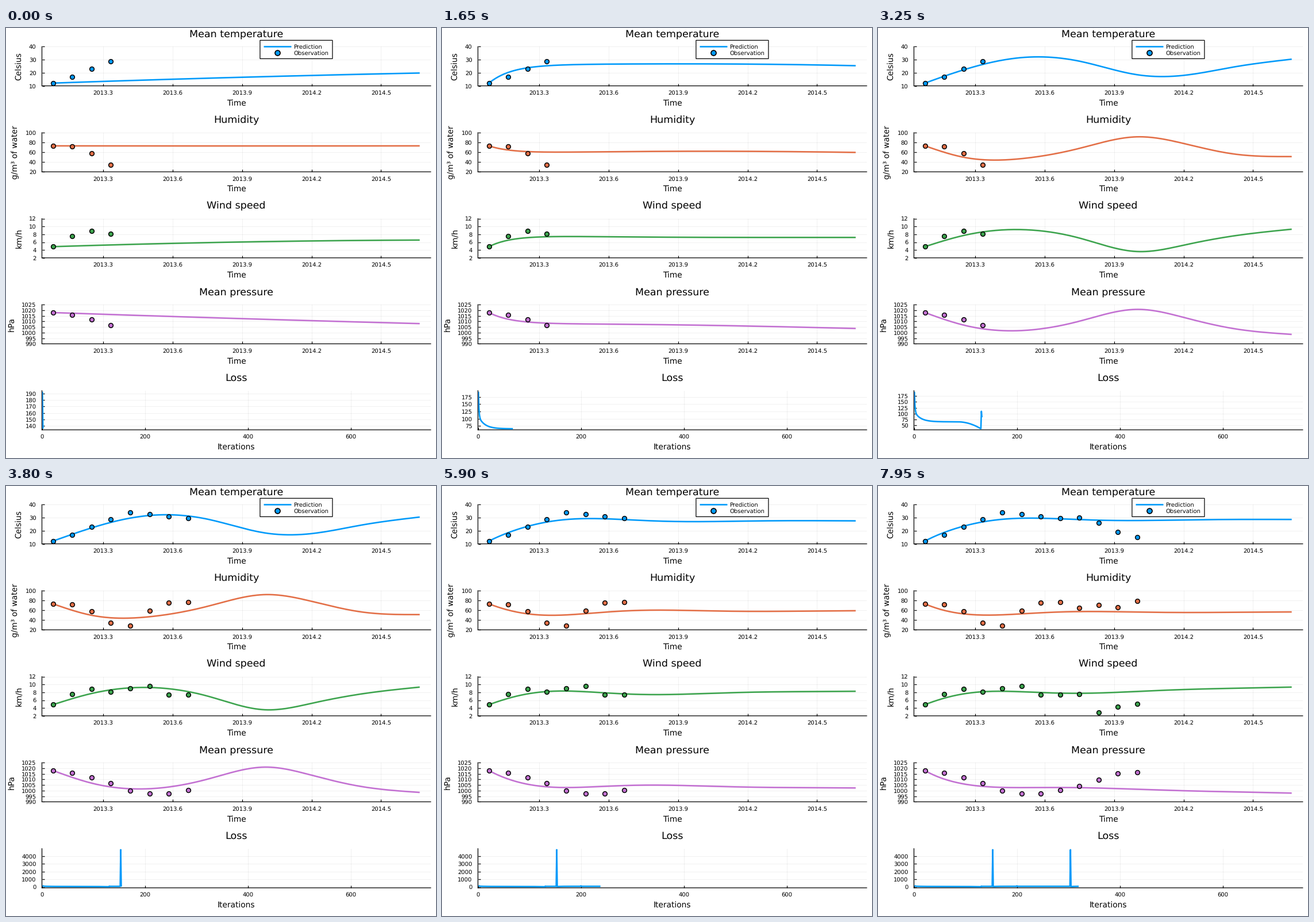
Write a matplotlib script that moves like this. It is 748x748 px and loops after 8 s.

```python
import numpy as np
import matplotlib.pyplot as plt
from matplotlib.animation import FuncAnimation
from matplotlib.lines import Line2D
from matplotlib.patches import Rectangle
from matplotlib.ticker import FuncFormatter, MultipleLocator
from matplotlib.transforms import Affine2D

S = 748            # stage size in pixels
PT = 0.72          # points per pixel at 100 dpi
FRAMES, STEP = 160, 50
LEFT, RIGHT, TOP, HEIGHT, ROW = 62.5, 738.8, 32.4, 68.2, 149.6
SMALL, MID, BIG = 9.97 * PT, 13.71 * PT, 17.45 * PT
LINE, AXIS = 2.6 * PT, 1.25 * PT
BLUE = "#009AFA"

plt.rcParams.update({"font.family": "DejaVu Sans", "text.hinting": "no_hinting"})
fig = plt.figure(figsize=(7.48, 7.48), dpi=100, facecolor="white")
PIX = Affine2D().scale(1 / S, -1 / S).translate(0, 1) + fig.transFigure

START = 2013 + 1 / 12
MONTHS = np.linspace(0, 19, 240)
SWING_KEYS = np.array([0, 2, 5, 8, 11, 13.5, 16, 19])
CALM_KEYS = np.array([2, 5, 9, 19])

# slope: first guess; rise, bend, level, last: values at CALM_KEYS;
# swing: values at SWING_KEYS after the start.
PANELS = [
    dict(title="Mean temperature", label="Celsius", label_x=26, color=BLUE,
         lim=(10, 40), step=10,
         obs=[12.1, 16.9, 22.85, 28.9, 33.85, 32.5, 30.75, 29.5, 29.9, 26.1, 18.9, 15.15],
         slope=(9.7, -2.0), rise=(23.8, 26.4, 26.8, 25.4), bend=(23.2, 27.0, 27.65, 25.0),
         level=(23.3, 29.2, 27.0, 27.15), last=(23.5, 29.6, 28.1, 28.65),
         swing=(22.2, 31.7, 28.9, 18.3, 18.0, 24.4, 30.5)),
    dict(title="Humidity", label="g/m³ of water", label_x=19.7, color="#E36F47",
         lim=(20, 100), step=20,
         obs=[73, 72, 57.6, 34.7, 29, 59, 75, 77, 64.7, 70.3, 66.3, 79.2],
         slope=(-0.8, 0.8), rise=(61.3, 60.5, 61.8, 59.6), bend=(54.5, 57.9, 68.2, 52.3),
         level=(52.7, 53.2, 61.4, 60.0), last=(52.6, 52.6, 57.3, 56.5),
         swing=(49.7, 46.7, 67.9, 91.9, 77.2, 56.4, 51.1)),
    dict(title="Wind speed", label="km/h", label_x=26, color="#3DA44E",
         lim=(2, 12), step=2,
         obs=[4.85, 7.5, 8.8, 8.07, 8.95, 9.6, 7.4, 7.4, 7.6, 2.82, 4.26, 5.0],
         slope=(3.0, -1.32), rise=(7.15, 7.42, 7.27, 7.2), bend=(7.75, 7.75, 6.76, 7.92),
         level=(7.6, 8.16, 7.25, 7.83), last=(7.6, 8.15, 7.83, 9.33),
         swing=(7.7, 9.23, 7.05, 3.54, 5.3, 7.6, 9.33)),
    dict(title="Mean pressure", label="hPa", label_x=13.5, color="#C371D2",
         lim=(990, 1025), step=5,
         obs=[1017.9, 1016, 1011.8, 1006.4, 999.9, 997.4, 997.4, 1000.5,
              1004, 1009.9, 1015.4, 1016.2],
         slope=(-11.2, 1.35), rise=(1009.5, 1007.75, 1007.1, 1003.7),
         bend=(1009.2, 1008.5, 1009.9, 999), level=(1005.6, 1003.3, 1005.95, 1004.25),
         last=(1006, 1002.7, 1002.3, 997.8),
         swing=(1006.7, 1001.7, 1010.2, 1021, 1013.3, 1003.6, 998.4)),
]


def spline(x, y, at):
    """Natural cubic spline through (x, y)."""
    n, h = len(x), np.diff(x)
    a, b = np.eye(n), np.zeros(n)
    for i in range(1, n - 1):
        a[i, i - 1:i + 2] = h[i - 1], 2 * (h[i - 1] + h[i]), h[i]
        b[i] = 6 * ((y[i + 1] - y[i]) / h[i] - (y[i] - y[i - 1]) / h[i - 1])
    m = np.linalg.solve(a, b)
    i = np.clip(np.searchsorted(x, at) - 1, 0, n - 2)
    u, v, w = x[i + 1] - at, at - x[i], h[i]
    return ((m[i] * u**3 + m[i + 1] * v**3) / (6 * w)
            + (y[i] / w - m[i] * w / 6) * u + (y[i + 1] / w - m[i + 1] * w / 6) * v)


def damped(y0, values, decay, freq, rush):
    """Quick rise, damped wave and drift from y0 through the values at CALM_KEYS."""
    def basis(t):
        fade = np.exp(-decay * t)
        return np.stack([1 - fade * np.cos(freq * t), fade * np.sin(freq * t),
                         1 - np.exp(-rush * t), t], axis=-1)
    return y0 + basis(MONTHS) @ np.linalg.solve(basis(CALM_KEYS), np.array(values) - y0)


def shapes(p):
    y0, (b, c), t = p["obs"][0], p["slope"], MONTHS / 19
    return np.array([
        y0 + b * t + c * t * t,
        damped(y0, p["rise"], 0, 0.12, 0.85),
        damped(y0, p["bend"], 0, 0.3, 0.65),
        spline(SWING_KEYS, np.array([y0, *p["swing"]]), MONTHS),
        damped(y0, p["level"], 0.22, 0.56, 0.7),
        damped(y0, p["last"], 0.22, 0.56, 0.7),
    ])


def linear(u):
    return u


def smooth(u):
    return u * u * (3 - 2 * u)


def late(u):
    return u ** 1.7


def settle(u):
    return (1 - np.exp(-8 * u)) / (1 - np.exp(-8))


# Frame, weights of the shapes there, easing on the way to it
GUESS, RISE, BEND, SWING, LEVEL, LAST = np.eye(6)
POSES = [(0, GUESS, linear), (33, RISE, settle), (54, BEND, late), (66, SWING, smooth),
         (76, SWING, linear), (99, 0.45 * LEVEL + 0.55 * LAST, settle),
         (139, LEVEL, linear), (150, LEVEL, linear), (151, SWING, linear),
         (158, LAST, smooth), (FRAMES, LAST, linear)]


def weights(k):
    for (k0, w0, _), (k1, w1, ease) in zip(POSES, POSES[1:]):
        if k <= k1:
            return w0 + (w1 - w0) * ease((k - k0) / (k1 - k0))


def loss_curve(n):
    fall = (65.5 + 46 * np.exp(-n / 12) + 85 * np.exp(1 - n)
            - 9 * (np.clip(n - 85, 0, 45) / 25) ** 2)
    loss = np.where(n <= 130, fall, 85.0)
    for kick in (153, 304):
        loss = np.where(n > kick, 90 - 40 * np.exp(-(n - kick - 1) / 6), loss)
        loss[n == kick] = 4840
    loss[n == 131] = 110
    loss[n == 200] = 150
    return loss


def write(x, y, text, size, **kw):
    fig.text(x, y, text, size=size, transform=PIX, va="baseline", **kw)


def add_panel(row, title, bottom, xticks, xformat):
    y = TOP + row * ROW
    ax = fig.add_axes([LEFT / S, 1 - (y + HEIGHT) / S, (RIGHT - LEFT) / S, HEIGHT / S])
    ax.set_axisbelow(True)
    ax.grid(color="black", alpha=0.07, lw=0.75 * PT)
    ax.tick_params(direction="in", length=4 * PT, width=AXIS, labelsize=SMALL)
    ax.tick_params(axis="x", pad=15.3 * PT)
    ax.tick_params(axis="y", pad=10 * PT)
    for side, spine in ax.spines.items():
        spine.set(visible=side in ("left", "bottom"), linewidth=AXIS, zorder=1, snap=False)
    ax.set_xticks(xticks, [format(t, xformat) for t in xticks])
    for text in ax.get_xticklabels():
        text.set_va("baseline")
    mid = (LEFT + RIGHT) / 2
    write(mid, y - 16.8, title, BIG, ha="center")
    write(mid, y + 102.2, bottom, MID, ha="center")
    return ax


def stroke(color):
    return dict(color=color, lw=LINE, solid_capstyle="butt", zorder=2)


def dots(size, edge, color):
    return dict(ls="none", marker="o", ms=size * PT, mew=edge * PT, mfc=color, mec="black",
                zorder=3)


years = START + MONTHS / 12
series = []
for row, p in enumerate(PANELS):
    ax = add_panel(row, p["title"], "Time", 2013.3 + 0.3 * np.arange(5), ".1f")
    write(p["label_x"], TOP + row * ROW + HEIGHT / 2, p["label"], MID, ha="center",
          rotation=90, rotation_mode="anchor")
    ax.set_xlim(START - 0.0475, START + 19 / 12 + 0.0475)
    low, high = p["lim"]
    ax.set_ylim(low, high)
    ax.set_yticks(range(low, high + 1, p["step"]))
    line, = ax.plot([], [], **stroke(p["color"]))
    seen, = ax.plot([], [], **dots(7.7, 1.5, p["color"]))
    series.append((line, seen, shapes(p), p["obs"]))

loss_ax = add_panel(4, "Loss", "Iterations", range(0, 601, 200), "d")
loss_ax.set_xlim(0, 755)
loss_ax.yaxis.set_major_formatter(FuncFormatter(lambda v, _: f"{v:.0f}"))
loss_line, = loss_ax.plot([], [], **stroke(BLUE))
iters = np.arange(1, 2 * FRAMES + 1)
losses = loss_curve(iters)

# Legend
fig.add_artist(Rectangle((441.9, 21.4), 126, 32, fc="white", ec="black", lw=AXIS,
                         snap=False, transform=PIX))
fig.add_artist(Line2D([447.9, 495.9], [32.4, 32.4], transform=PIX, **stroke(BLUE)))
fig.add_artist(Line2D([471.9], [43], transform=PIX, **dots(9, 1.7, BLUE)))
write(500.4, 36.1, "Prediction", SMALL)
write(500.4, 46.7, "Observation", SMALL)


def update(k):
    mix = weights(k)
    count = 4 if k < 75 else 8 if k < 151 else 12
    for line, seen, curves, obs in series:
        line.set_data(years, mix @ curves)
        seen.set_data(START + np.arange(count) / 12, obs[:count])
    n = 2 * (k + 1)
    y = losses[:n]
    loss_line.set_data(iters[:n], y)
    low, high = y.min(), y.max()
    span = high - low
    loss_ax.set_ylim(low - 0.03 * span, high + 0.03 * span)
    step = 10 if span < 65 else 20 if span < 105 else 25 if span < 500 else 1000
    loss_ax.yaxis.set_major_locator(MultipleLocator(step))
    return []


anim = FuncAnimation(fig, update, frames=FRAMES, interval=STEP, repeat=True,
                     repeat_delay=0, blit=False)
plt.show()
```
